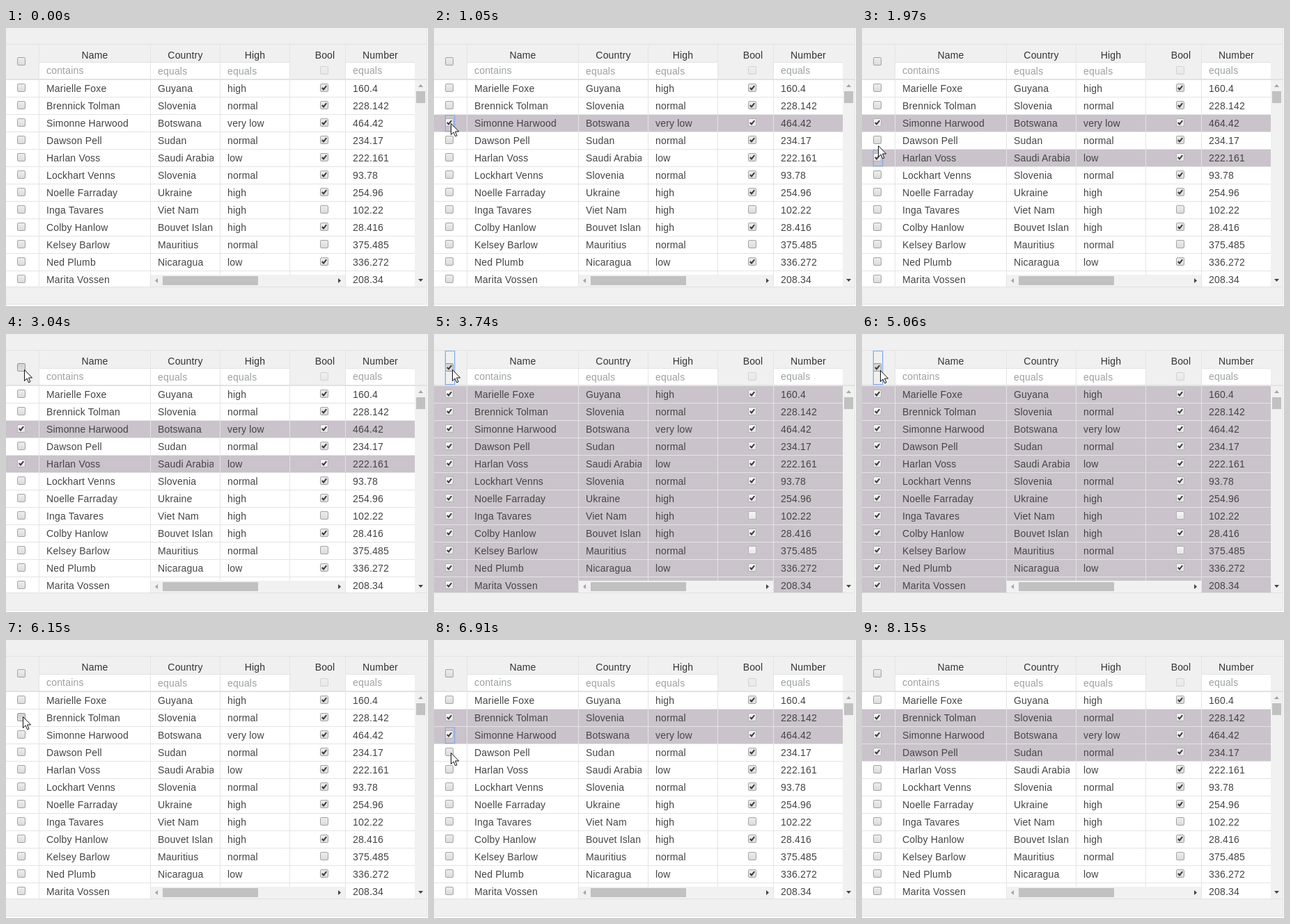
An HTML page for the animation above (8230 ms loop, 606x400 px).

```html
<!DOCTYPE html>
<html lang="en">
<head>
<meta charset="utf-8">
<title>Grid row selection</title>
<style>
  html, body { margin: 0; width: 100%; height: 100%; overflow: hidden; background: #fff; }
  body { font: 14px/24px Arial, "Liberation Sans", sans-serif; letter-spacing: .18px; color: #444; }
  div, svg { position: absolute; box-sizing: border-box; }
  #panel { left: 0; top: 0; width: 605px; height: 398px; background: #f0f0f0;
    border: solid #e2e2e2; border-width: 0 1px 1px 0; }
  #grid { left: 0; top: 23px; width: 604px; height: 350px; overflow: hidden;
    border: solid #e2e2e2; border-width: 1px 0; }
  #head { left: 0; top: 0; width: 604px; height: 51px; border-bottom: 2px solid #e2e2e2; }
  .row { left: 0; width: 587px; height: 25px; background: #fff; overflow: hidden; }
  .row.on { background: #cac3cb; }
  .cell { top: 0; height: 100%; border: solid #e4e4e4; border-width: 0 1px 0 0; }
  .cell.last { border-right-width: 0; }
  .row .cell { border-bottom-width: 1px; }
  .txt { left: 10px; right: 9px; top: 0; height: 24px; overflow: hidden; white-space: nowrap; }
  .title { left: 0; right: 0; top: 3px; text-align: center; color: #333; }
  .filter { left: 0; right: 0; top: 25px; height: 24px; background: #fff;
    border-top: 1px solid #e4e4e4; color: #9ba29b; }
  .box { width: 12px; height: 12px; border: 1px solid #a3a3a3; border-radius: 2px;
    background: linear-gradient(#ededed, #dcdcdc); }
  .on .box { border-color: #b4b0b5; background: linear-gradient(#f6f6f6, #e6e6e6); }
  .box.down { border-color: #949494; background: linear-gradient(#d2d2d2, #dedede); }
  .box svg { left: -1px; top: -1px; width: 12px; height: 12px; visibility: hidden; }
  .box.tick svg { visibility: visible; }
  .ring { left: 16px; top: 0; width: 14px; height: 24px; border: 1px solid #83a9ea;
    box-shadow: 0 0 0 1px rgba(131, 169, 234, .25); visibility: hidden; }
  #head .ring { height: 49px; }
  .bar { background: #f1f1f1; }
  .thumb { background: #c1c1c1; }
  .bar svg { width: 17px; height: 17px; fill: #a3a3a3; }
  .bar svg + div + svg { fill: #444; }
  #across { left: 208px; top: 331px; width: 279px; height: 17px; }
  #across .thumb { left: 17px; top: 2px; width: 137px; height: 13px; }
  #down { left: 587px; top: 51px; width: 17px; height: 296px; }
  #down .thumb { left: 2px; top: 16px; width: 13px; height: 17px; }
  #cursor { left: 0; top: 0; width: 14px; height: 22px; overflow: visible; }
</style>
</head>
<body>
<div id="panel">
  <div id="grid">
    <div id="head"></div>
    <div class="bar" id="across">
      <svg style="left:0"><path d="M10 5v7l-4-3.5z"/></svg>
      <div class="thumb"></div>
      <svg style="right:0"><path d="M7 5v7l4-3.5z"/></svg>
    </div>
    <div class="bar" id="down">
      <svg style="top:0"><path d="M5 10h7l-3.5-4z"/></svg>
      <div class="thumb"></div>
      <svg style="bottom:0"><path d="M5 7h7l-3.5 4z"/></svg>
    </div>
  </div>
</div>
<svg id="cursor"><path d="M.5 .5V16.5L4.1 13L6.6 18.8L9 17.8L6.5 12H11.6Z" fill="#fff" stroke="#111"/></svg>
<script>
const LOOP = 8230, STEP = 76, PRESS = 170, ALL = -1;

const people = `Marielle Foxe|Guyana|high|1|160.4
Brennick Tolman|Slovenia|normal|1|228.142
Simonne Harwood|Botswana|very low|1|464.42
Dawson Pell|Sudan|normal|1|234.17
Harlan Voss|Saudi Arabia|low|1|222.161
Lockhart Venns|Slovenia|normal|1|93.78
Noelle Farraday|Ukraine|high|1|254.96
Inga Tavares|Viet Nam|high|0|102.22
Colby Hanlow|Bouvet Island|high|1|28.416
Kelsey Barlow|Mauritius|normal|0|375.485
Ned Plumb|Nicaragua|low|1|336.272
Marita Vossen||||208.34`.split('\n').map(line => line.split('|'));

const columns = [
  { title: 'Name', width: 160, hint: 'contains', lift: -1 },
  { title: 'Country', width: 100, hint: 'equals', lift: 0 },
  { title: 'High', width: 100, hint: 'equals', lift: 0 },
  { title: 'Bool', width: 80 },
  { title: 'Number', width: 99, hint: 'equals', lift: -1 }
];

// each click toggles its row, or every row
const clicks = [
  { t: 980, row: 2 }, { t: 1670, row: 4 },
  { t: 3200, row: ALL }, { t: 3910, row: ALL }, { t: 4600, row: ALL }, { t: 5230, row: ALL },
  { t: 6300, row: 1 }, { t: 6610, row: 2 }, { t: 7290, row: 3 }
];

// cursor stops: arrival time, travel time, x, y
const entry = { t: 130, x: 425, y: 351 };
const exit = 7680;
const stops = [
  [750, 620, 12, 150], [830, 80, 24, 137], [1520, 400, 22, 198],
  [2440, 690, 29, 58], [2740, 230, 26, 51], [5060, 0, 26, 52],
  [5680, 450, 24, 116], [6000, 150, 24, 110], [6470, 200, 24, 140],
  [6990, 350, 24, 167], [7600, 300, 270, 298]
];

function add(parent, cls, style = '', text = '') {
  const el = document.createElement('div');
  el.className = cls;
  el.style.cssText = style;
  el.textContent = text;
  parent.append(el);
  return el;
}
function addBox(parent, x, y, ticked) {
  const box = add(parent, 'box', `left:${x}px;top:${y}px`);
  box.innerHTML = '<svg><path d="M2.8 6L5 8.4L9.2 3.2" fill="none" stroke="#3a3a3a" stroke-width="2"/></svg>';
  box.classList.toggle('tick', ticked);
  return box;
}
// first cell with selector box and focus ring, then one cell per column
function addCells(el, boxTop, fill) {
  add(el, 'cell', 'left:0;width:48px');
  const box = addBox(el, 16, boxTop, false);
  const ring = add(el, 'ring');
  let x = 48;
  columns.forEach((col, i) => {
    const cls = i === columns.length - 1 ? 'cell last' : 'cell';
    fill(add(el, cls, `left:${x}px;width:${col.width}px`), col, i);
    x += col.width;
  });
  return { el, box, ring };
}

const grid = document.getElementById('grid');
const cursor = document.getElementById('cursor');

const head = addCells(document.getElementById('head'), 18, (cell, { title, hint, lift }) => {
  add(cell, 'title', hint ? '' : 'left:21px', title);
  if (hint) add(add(cell, 'filter'), 'txt', `top:${lift}px`, hint);
  else addBox(cell, 43, 31, false).style.opacity = .4;
});

const rows = people.map((person, r) => {
  const el = add(grid, 'row', `top:${51 + 25 * r}px`);
  grid.insertBefore(el, document.getElementById('across'));
  return addCells(el, 5, (cell, col, i) => {
    if (col.title === 'Bool') addBox(cell, 43, 5, person[i] === '1');
    else add(cell, 'txt', '', person[i]);
  });
});

const show = (el, on) => { el.style.visibility = on ? 'visible' : 'hidden'; };

function selection(t) {
  const picked = new Set();
  for (const { row } of clicks.filter(c => c.t <= t)) {
    const had = picked.has(row);
    if (row === ALL) picked.clear();
    if (had) picked.delete(row);
    else picked.add(row);
  }
  return picked;
}

function placeCursor(t) {
  show(cursor, t >= entry.t && t < exit);
  let { x, y } = entry;
  const now = entry.t + Math.floor((t - entry.t) / STEP) * STEP;
  for (const [end, span, toX, toY] of stops) {
    const u = t >= end ? 1 : Math.max(0, 1 - (end - now) / span);
    const p = u * u * (3 - 2 * u);
    x += (toX - x) * p;
    y += (toY - y) * p;
    if (u < 1) break;
  }
  cursor.style.transform = `translate(${Math.round(x)}px, ${Math.round(y)}px)`;
}

function draw(t) {
  const picked = selection(t);
  const all = picked.has(ALL);
  const last = clicks.filter(c => c.t <= t).pop();
  const next = clicks.find(c => c.t > t);
  const pressed = next && t >= next.t - PRESS ? next.row : null;
  const focused = last && t < LOOP - 80 && (pressed === null || pressed === last.row) ? last.row : null;

  const paint = ({ el, box, ring }, id, on) => {
    el.classList.toggle('on', on && id !== ALL);
    box.classList.toggle('tick', on);
    box.classList.toggle('down', pressed === id);
    show(ring, focused === id);
  };
  paint(head, ALL, all);
  rows.forEach((row, i) => paint(row, i, all || picked.has(i)));
  placeCursor(t);
}

const start = performance.now();
function tick() {
  draw((performance.now() - start) % LOOP);
  requestAnimationFrame(tick);
}
draw(0);
requestAnimationFrame(tick);
</script>
</body>
</html>
```
